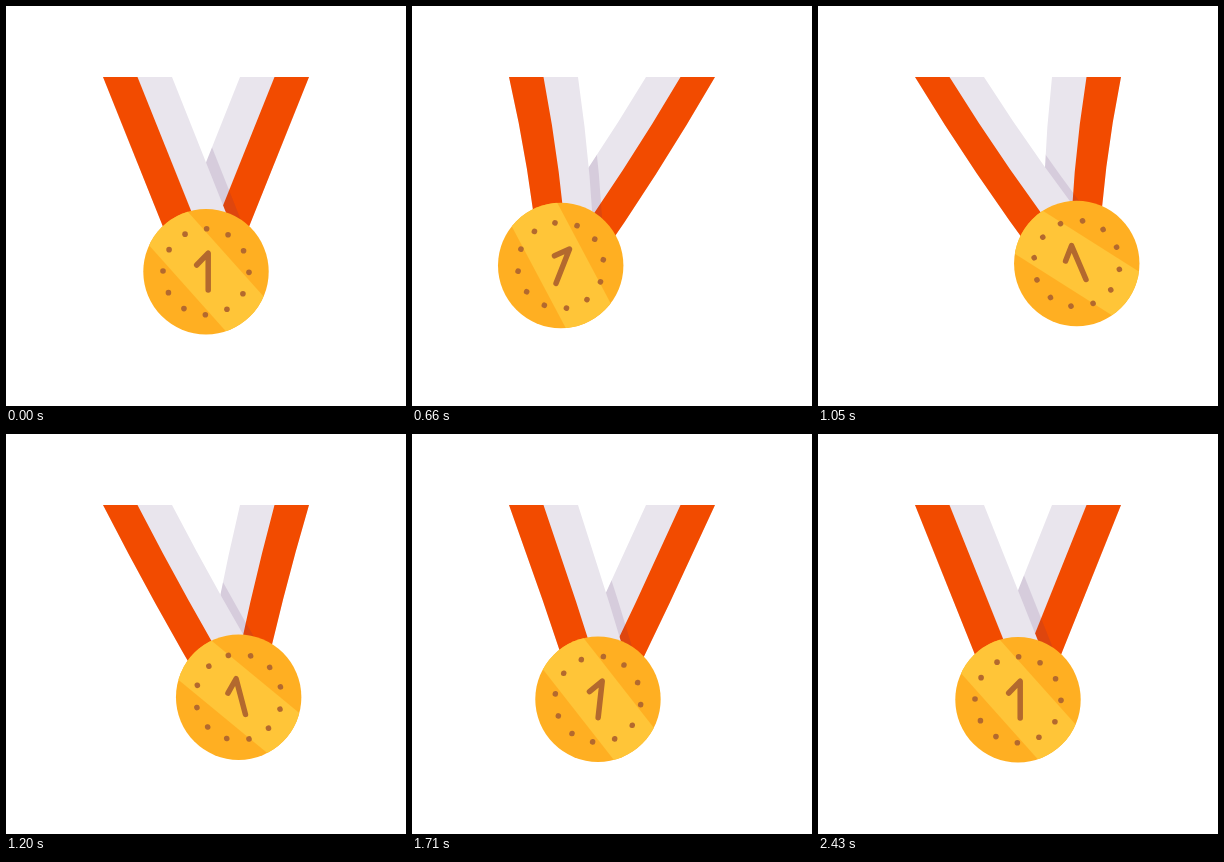
Write an HTML page with a canvas that moves like this. It is 400 px wide and 400 px high and loops after 5.09 s.

```html
<!DOCTYPE html>
<html lang="en">
<head>
<meta charset="utf-8">
<title>Swinging medal</title>
<style>
html, body { margin: 0; height: 100%; overflow: hidden; background: #fff; }
canvas { display: block; width: 400px; height: 400px; }
</style>
</head>
<body>
<canvas id="stage" width="400" height="400"></canvas>
<script>
const ctx = document.getElementById('stage').getContext('2d');
const LOOP = 5090, END = 2430, STEP = 30;
const TOP = 71, REST_Y = 265.7, ARM = 215, RADIUS = 62.7;
const RED = '#f24b00', WHITE = '#e9e5ed', GOLD = '#ffaf22', SHINE = '#ffc538', BROWN = '#b3692e';

// [time, sideways offset]: pulled left, held, released, damped
const KEYS = [[0, 0], [330, -58.8], [600, -58.8], [975, 62.5], [1538, -24], [1990, 7.5], [END, 0]];

function swing(t) {
  if (t <= 0 || t >= END) return 0;
  const i = KEYS.findIndex(k => k[0] > t);
  const [t0, x0] = KEYS[i - 1], [t1, x1] = KEYS[i];
  return x0 + (x1 - x0) * (1 - Math.cos(Math.PI * (t - t0) / (t1 - t0))) / 2;
}

const angleAt = x => -Math.asin(x / ARM);

// Ribbons narrow a little as soon as they swing
const pinchAt = x => Math.min(2.5, Math.abs(x) / 3);

// Edges of one ribbon from outside in; side is -1 (left) or 1 (right)
function ribbonEdges(side, x, cx, cy, angle) {
  const far = side * x < 0, pinch = pinchAt(x);
  const edges = [[103, 25 - pinch, 0], [68.5, -9.5 - pinch / 3, 0.05], [34, -43.5, 0.15]];
  return edges.map(([top, end, near]) => {
    const x0 = 200 + side * top;
    const x1 = cx + side * end * Math.cos(angle) + x * (far ? -0.17 : near);
    const y1 = cy + side * end * Math.sin(angle);
    return { x0, x1, y1, mx: (x0 + x1) / 2 - 0.115 * x, my: (TOP + y1) / 2 };
  });
}

function band(a, b, dx = 0) {
  const path = new Path2D();
  path.moveTo(a.x0 + dx, TOP);
  path.quadraticCurveTo(a.mx + dx, a.my, a.x1 + dx, a.y1);
  path.lineTo(b.x1 + dx, b.y1);
  path.quadraticCurveTo(b.mx + dx, b.my, b.x0 + dx, TOP);
  path.closePath();
  return path;
}

function fill(path, color) {
  ctx.fillStyle = color;
  ctx.fill(path);
}

function drawRibbon([outer, middle, inner]) {
  fill(band(outer, inner), WHITE);
  fill(band(outer, middle), RED);
}

function drawRibbons(x, cx, cy, angle) {
  const left = ribbonEdges(-1, x, cx, cy, angle);
  const right = ribbonEdges(1, x, cx, cy, angle);
  drawRibbon(right);
  ctx.save();
  ctx.clip(band(right[0], right[2]));
  fill(band(left[0], left[2], 12 - pinchAt(x)), 'rgba(90, 40, 110, 0.13)');
  ctx.restore();
  drawRibbon(left);
}

function drawMedal(cx, cy, angle, faceAngle) {
  const disc = new Path2D();
  disc.arc(0, 0, RADIUS, 0, 2 * Math.PI);

  ctx.save();
  ctx.translate(cx, cy);
  fill(disc, GOLD);
  ctx.save();
  ctx.clip(disc);
  ctx.rotate(angle + 48.2 * Math.PI / 180);
  ctx.fillStyle = SHINE;
  ctx.fillRect(-70, -26.4, 140, 51.3);
  ctx.restore();

  ctx.rotate(faceAngle);
  ctx.fillStyle = ctx.strokeStyle = BROWN;
  for (let i = 0; i < 12; i++) {
    const a = i * Math.PI / 6 + 0.015;
    ctx.beginPath();
    ctx.arc(43 * Math.sin(a), -43 * Math.cos(a), 2.8, 0, 2 * Math.PI);
    ctx.fill();
  }
  ctx.lineWidth = 5.5;
  ctx.lineCap = ctx.lineJoin = 'round';
  ctx.beginPath();
  ctx.moveTo(-9.3, -6.7);
  ctx.lineTo(2.2, -18.5);
  ctx.lineTo(2.2, 18.3);
  ctx.stroke();
  ctx.restore();
}

function draw(now) {
  const t = Math.min(END, Math.floor(now % LOOP / STEP) * STEP);
  const x = swing(t), angle = angleAt(x);
  const cx = 200 + x, cy = REST_Y - ARM * (1 - Math.cos(angle));
  // The face turns further than the disc and a little later
  const faceAngle = t < END ? 1.4 * angleAt(swing(t - 30)) : 0;
  ctx.clearRect(0, 0, 400, 400);
  drawRibbons(x, cx, cy, angle);
  drawMedal(cx, cy, angle, faceAngle);
}

const start = performance.now();
function tick() {
  draw(performance.now() - start);
  requestAnimationFrame(tick);
}
tick();
</script>
</body>
</html>
```
